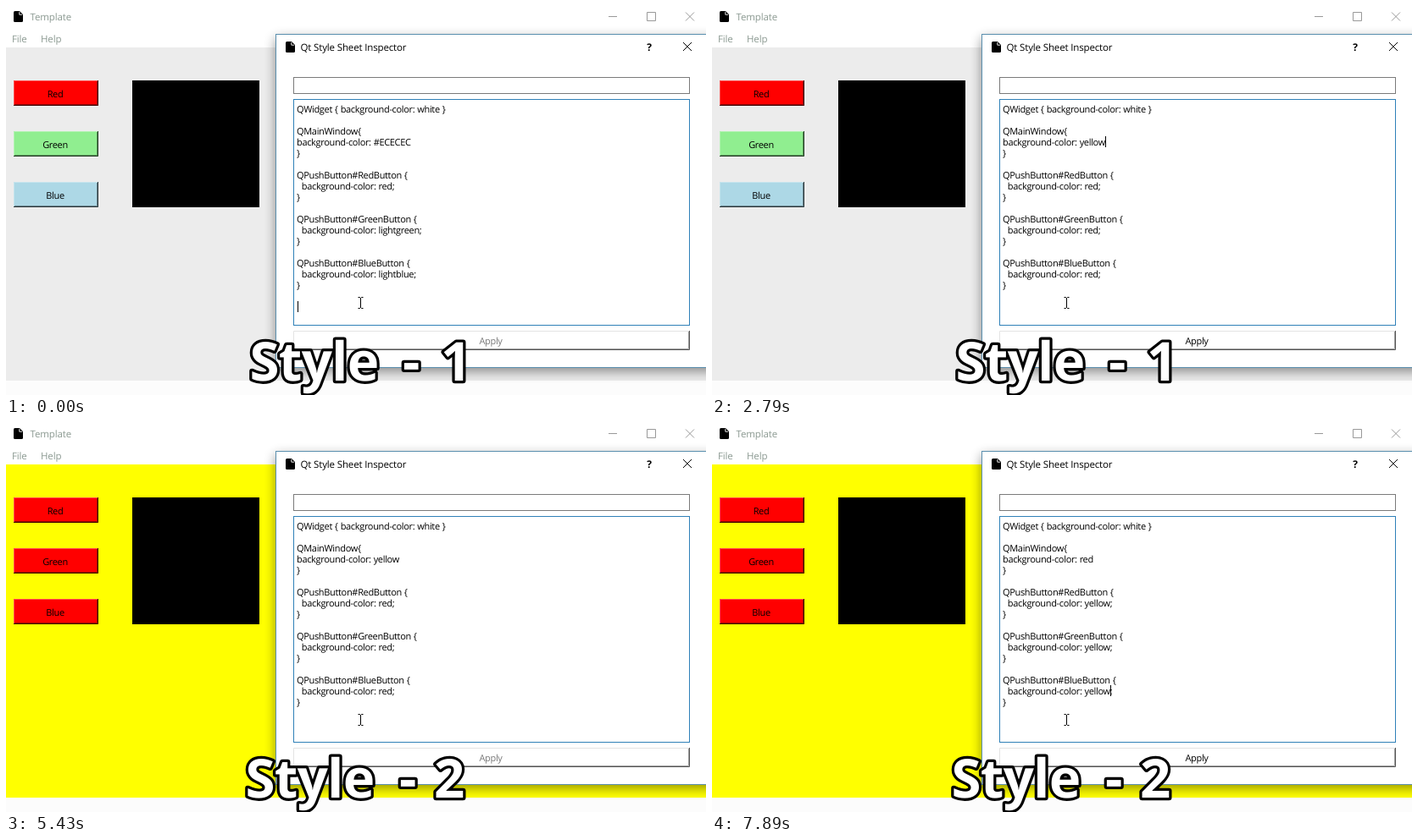
Animation of 826 by 460 pixels, one loop 8 s. Source, as an HTML page:

```html
<!DOCTYPE html>
<html lang="en">
<head>
<meta charset="utf-8">
<title>Style sheet demo</title>
<style>
  html, body { margin: 0; width: 100%; height: 100%; overflow: hidden; background: #fff; }
  svg { display: block; width: 826px; height: 460px; }
  text { font-family: "Open Sans", "Noto Sans", sans-serif; white-space: pre; text-rendering: geometricPrecision; }
  .ui { font-size: 11.5px; letter-spacing: -.14px; }
  .small { font-size: 11px; letter-spacing: -.33px; word-spacing: .4px; }
  .mid { text-anchor: middle; }
  .dim { fill: #8c9a92; }
  .line { fill: none; stroke-width: 1; }
  #caption { font-size: 63.5px; font-weight: 700; letter-spacing: -.7px; fill: #fff; stroke: #000;
    stroke-width: 6.5px; stroke-linejoin: round; paint-order: stroke; }
</style>
</head>
<body>
<svg viewBox="0 0 826 460">
  <defs>
    <path id="doc" d="M1.5 0H7L11 4V11.5Q11 13 9.5 13H1.5Q0 13 0 11.5V1.5Q0 0 1.5 0Z"/>
    <path id="fold" d="M6.8 .8V4.2H10.2" fill="none" stroke="#fff" stroke-width=".9"/>
    <path id="cross" class="line" d="M0 0L10 10M10 0L0 10"/>
  </defs>

  <!-- main window -->
  <rect width="826" height="460" fill="#fff"/>
  <rect y="443" width="826" height="17" fill="#fcfcfc"/>
  <rect id="main" y="49" width="826" height="394"/>
  <use href="#doc" x="9" y="6"/><use href="#fold" x="9" y="6"/>
  <text class="ui dim" x="28.5" y="17">Template</text>
  <text class="ui dim" x="7" y="43">File</text>
  <text class="ui dim" x="41" y="43">Help</text>
  <path class="line" stroke="#999" d="M711 12.5H721M756.5 7.5H766.5V17.5H756.5Z"/>
  <use href="#cross" x="802" y="7.5" stroke="#999"/>
  <g id="buttons"></g>
  <rect x="149" y="88" width="150" height="150"/>

  <!-- inspector dialog -->
  <rect x="318" y="38" width="530" height="394" fill="#000" opacity=".42" style="filter:blur(7px)"/>
  <rect x="318.5" y="33.5" width="520" height="394" fill="#fff" stroke="#5a8fae"/>
  <use href="#doc" x="330" y="42"/><use href="#fold" x="330" y="42"/>
  <text class="ui" x="347.5" y="53">Qt Style Sheet Inspector</text>
  <text class="mid" x="759" y="52.5" font-size="12" font-weight="700">?</text>
  <use href="#cross" x="799" y="43" stroke="#000"/>
  <rect class="line" x="339.5" y="84.5" width="467" height="19" stroke="#7a7a7a"/>
  <rect class="line" x="339.5" y="110.5" width="467" height="267" stroke="#2f80b8"/>
  <g id="code"></g>
  <rect id="caret" width="1" height="13"/>
  <path class="line" stroke="#e3e3e3" d="M339.5 406V384.5H806"/>
  <path class="line" stroke="#a0a0a0" d="M340 405.5H805.5V385"/>
  <path class="line" stroke="#555" d="M339 406.5H806.5V384"/>
  <text id="apply" class="small mid" x="572" y="400">Apply</text>
  <path class="line" stroke="#000" d="M415.5 344.5H417.5L418.5 345.5L419.5 344.5H421.5M418.5 345V357M415.5 357.5H417.5L418.5 356.5L419.5 357.5H421.5"/>

  <text id="caption" y="442.5"><tspan>Style</tspan><tspan>-</tspan><tspan></tspan></text>
</svg>
<script>
const LOOP = 8000;
const NAMES = ["Red", "Green", "Blue"];
// Each sheet: main window colour, then the three button colours
const SHEETS = [
  ["#ECECEC", "red", "lightgreen", "lightblue"],
  ["yellow", "red", "red", "red"],
  ["red", "yellow", "yellow", "yellow"]
];
// When each sheet is typed, and where its caret stands
const EDITS = [
  { at: 0, x: 344, y: 349 },
  { at: 2570, x: 464, y: 154 },
  { at: 6680, x: 470, y: 310 }
];
const APPLIED = 3120;
const BLINKS = [300, 810, 1370, 1880, 2390, 2790, 3300, 3810, 4370, 4890,
  5430, 5940, 6450, 6820, 7380, 7890];
const CAPTIONS = [["1", [287.5, 468, 513]], ["2", [282.5, 464, 505]]];

const el = id => document.getElementById(id);
const passed = (times, t) => times.filter(x => x <= t).length;

el("buttons").innerHTML = NAMES.map((name, i) => `
  <g transform="translate(9 ${88 + 60 * i})">
    <rect class="face" width="100" height="30"/>
    <path class="line" stroke="#fff" stroke-opacity=".3" d="M.5 29V.5H99"/>
    <path class="line" stroke="#000" stroke-opacity=".4" d="M1 28.5H98.5V1"/>
    <path class="line" stroke="#000" stroke-opacity=".75" d="M0 29.5H99.5V0"/>
    <text class="small mid" x="49" y="20">${name}</text>
  </g>`).join("");
const faces = document.querySelectorAll(".face");
const words = el("caption").children;

function sheetLines([main, ...colors]) {
  const lines = ["QWidget { background-color: white }", "", "QMainWindow{", "background-color: " + main, "}"];
  NAMES.forEach((name, i) =>
    lines.push("", `QPushButton#${name}Button {`, `  background-color: ${colors[i]};`, "}"));
  return lines;
}

function showCode(sheet) {
  el("code").innerHTML = sheetLines(sheet).map((line, i) =>
    `<text class="small" x="343" y="${126 + 13 * i}">${line}</text>`).join("");
}

function showStyle(n) {
  const [main, ...colors] = SHEETS[n];
  const [digit, xs] = CAPTIONS[n];
  el("main").setAttribute("fill", main);
  faces.forEach((face, i) => face.setAttribute("fill", colors[i]));
  words[2].textContent = digit;
  xs.forEach((x, i) => words[i].setAttribute("x", x));
}

let lastEdit, lastStyle;
function draw(now) {
  const t = now % LOOP;
  const edit = passed(EDITS.map(e => e.at), t) - 1;
  const style = t < APPLIED ? 0 : 1;
  if (edit !== lastEdit) showCode(SHEETS[lastEdit = edit]);
  if (style !== lastStyle) showStyle(lastStyle = style);
  el("apply").setAttribute("fill", edit === style ? "#787878" : "#000");
  const caret = el("caret");
  caret.setAttribute("x", EDITS[edit].x);
  caret.setAttribute("y", EDITS[edit].y);
  caret.setAttribute("visibility", passed(BLINKS, t) % 2 ? "hidden" : "visible");
}

const start = performance.now();
function tick() {
  draw(performance.now() - start);
  requestAnimationFrame(tick);
}
tick();
</script>
</body>
</html>
```
